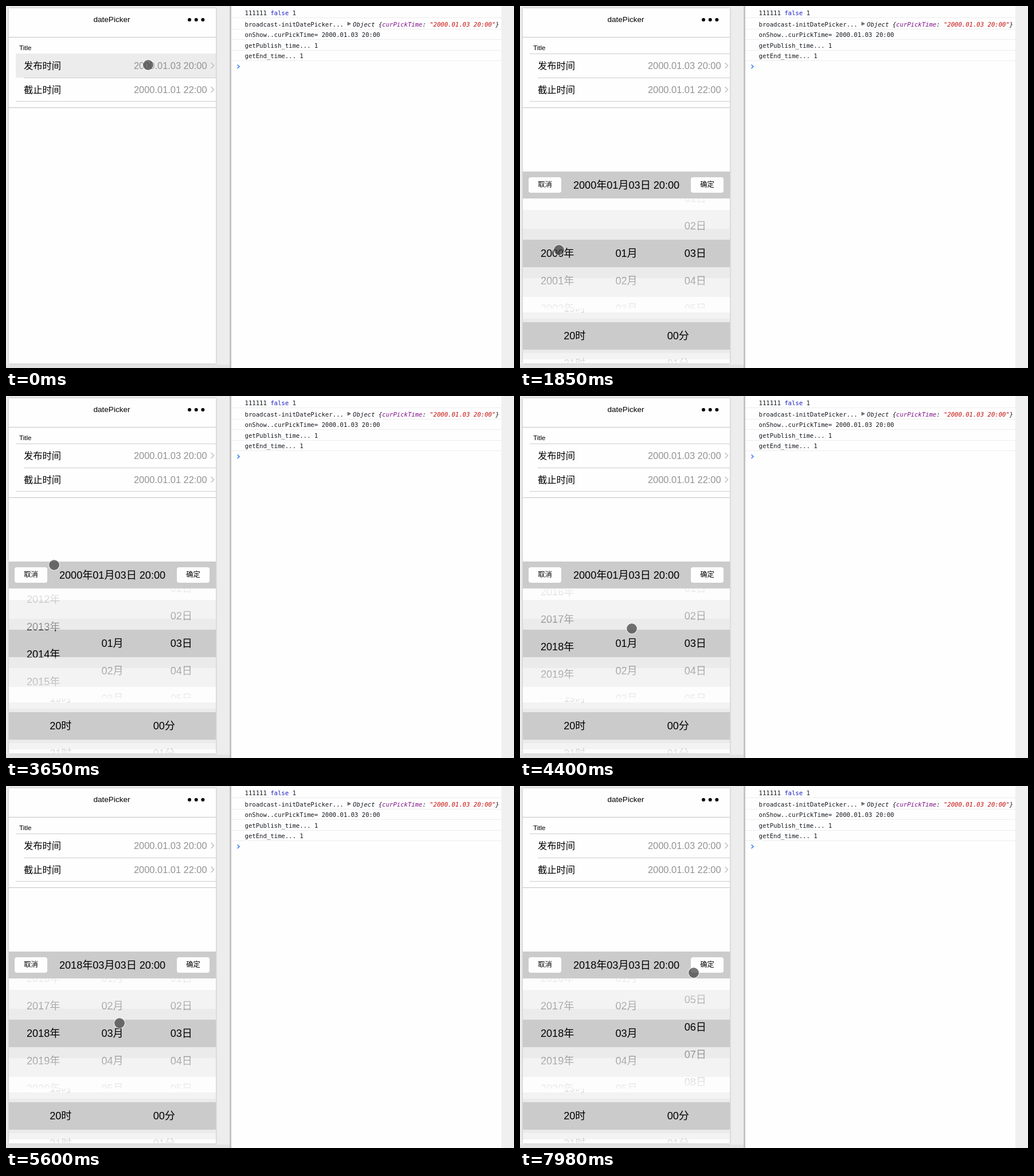
An HTML page for the animation above (8000 ms loop, 886 px wide and 632 px high).

```html
<!DOCTYPE html>
<html lang="zh-CN">
<head>
<meta charset="utf-8">
<title>datePicker</title>
<style>
  html, body { margin: 0; width: 100%; height: 100%; overflow: hidden; }
  #stage {
    position: relative; width: 886px; height: 632px; overflow: hidden; background: #ededed;
    font-family: "Liberation Sans", "Noto Sans CJK SC", "Noto Sans CJK", sans-serif; color: #000;
  }
  #stage div, #stage svg, #stage p { position: absolute; margin: 0; }
  p { line-height: 20px; white-space: pre; }

  .floor { left: 0; top: 626px; width: 390px; height: 6px; background: #e3e3e3; }
  .phone { left: 5px; top: 4px; width: 361px; height: 620px; background: #fefefe; box-shadow: 0 0 3px rgba(0, 0, 0, .25); }
  .rule { height: 1px; background: #cdcdcd; }
  .rule.full { left: 5px; width: 361px; background: #c4c4c4; }
  .press { left: 17px; top: 83px; width: 349px; height: 42px; background: #ececec; animation: leave 8s step-end infinite; }
  .title { left: 4px; top: 14px; width: 361px; text-align: center; font-size: 13.6px; }
  .label { left: 31px; font-size: 16.3px; }
  .value { left: 223px; font-size: 16.4px; color: #929292; }

  .panel { left: 5px; top: 289px; width: 361px; height: 335px; animation: enter 8s step-end infinite; }
  @keyframes leave { 0% { visibility: visible; } 1.75%, 100% { visibility: hidden; } }
  @keyframes enter { 0% { visibility: hidden; } 1.75%, 100% { visibility: visible; } }
  .head { left: 0; top: 0; width: 361px; height: 47px; background: #cbcbcb; }
  .head p { left: 0; width: 361px; top: 14px; text-align: center; font-size: 18.1px; }
  .btn { top: 10px; width: 57px; height: 27px; border-radius: 4px; background: #fefefe; font-size: 12.3px; line-height: 27px; text-align: center; }

  .picker {
    --band: calc(50% - 24px);
    left: 0; width: 361px; overflow: hidden; background: linear-gradient(
      #fdfdfd calc(var(--edge) * .28), #f3f3f3 0 calc(var(--edge) * .73), #ebebeb 0 var(--band),
      #cbcbcb 0 calc(100% - var(--band)), #ebebeb 0 calc(100% - var(--edge) * .73),
      #f3f3f3 0 calc(100% - var(--edge) * .28), #fdfdfd 0);
  }
  #date { --edge: 72px; top: 47px; height: 192px; }
  #time { --edge: 24px; top: 239px; height: 96px; }
  .wheels {
    --fade: linear-gradient(rgba(0, 0, 0, .05), rgba(0, 0, 0, .42) var(--band), #000 0 calc(100% - var(--band)), rgba(0, 0, 0, .42) 0, rgba(0, 0, 0, .05));
    inset: 0; -webkit-mask-image: var(--fade); mask-image: var(--fade);
  }
  .wheel { top: var(--edge); text-align: center; font-size: 18.1px; line-height: 48px; white-space: pre; }

  .split { left: 390px; top: 0; width: 3px; height: 632px; background: #c3c3c3; }
  .console {
    left: 393px; top: 0; width: 471px; height: 632px; background: #fefefe;
    font-family: "DejaVu Sans Mono", monospace; font-size: 10.6px; color: #14181e;
  }
  .console p { left: 23.5px; }
  .console .rule { left: 0; width: 471px; background: #ededed; }
  .gutter { left: 864px; top: 0; width: 22px; height: 632px; background: #f0f0f0; }
  .bool { color: #1c1cc4; } .key { color: #80108a; } .str { color: #c4100c; }

  #cursor {
    left: -10px; top: -10px; width: 20px; height: 20px; box-sizing: border-box; border-radius: 50%;
    border: 1.5px solid rgba(255, 255, 255, .7); background: rgba(60, 60, 60, .7) padding-box;
  }
</style>
</head>
<body>
<div id="stage">
  <div class="floor"></div>
  <div class="phone"></div>
  <p class="title">datePicker</p>
  <svg width="40" height="10" style="left:312px;top:19px"><circle cx="8" cy="5" r="3"/><circle cx="19.7" cy="5" r="3"/><circle cx="31.3" cy="5" r="3"/></svg>
  <div class="rule full" style="top:54px"></div>
  <p style="left:23px;top:63px;font-size:11.6px">Title</p>
  <div class="rule" style="left:17px;top:83px;width:349px"></div>
  <div class="press"></div>
  <div class="rule" style="left:31px;top:125px;width:335px"></div>
  <div class="rule" style="left:17px;top:166px;width:349px"></div>
  <div class="rule full" style="top:177px"></div>
  <p class="label" style="top:94px">发布时间</p>
  <p class="value" style="top:94px">2000.01.03 20:00</p>
  <p class="label" style="top:136px">截止时间</p>
  <p class="value" style="top:136px">2000.01.01 22:00</p>
  <svg width="10" height="60" style="left:355px;top:95px" fill="none" stroke="#c2c2c2" stroke-width="1.6"><path d="M2.5 4l5 5-5 5M2.5 46l5 5-5 5"/></svg>

  <div class="panel">
    <div class="head">
      <div class="btn" style="left:10px">取消</div>
      <p id="picked"></p>
      <div class="btn" style="left:293px">确定</div>
    </div>
    <div class="picker" id="date"><div class="wheels"></div></div>
    <div class="picker" id="time"><div class="wheels"></div></div>
  </div>

  <div class="split"></div>
  <div class="console">
    <p style="top:2px">111111 <span class="bool">false</span> 1</p>
    <div class="rule" style="top:20px"></div>
    <p style="top:22px">broadcast-initDatePicker...</p>
    <svg width="8" height="8" style="left:202px;top:27px"><path d="M.5.5L7 4 .5 7.5z" fill="#6e6e6e"/></svg>
    <p style="left:212px;top:22px"><i>Object {<span class="key">curPickTime</span>: <span class="str">"2000.01.03 20:00"</span>}</i></p>
    <div class="rule" style="top:40px"></div>
    <p style="top:40px">onShow..curPickTime= 2000.01.03 20:00</p>
    <div class="rule" style="top:58px"></div>
    <p style="top:59px">getPublish_time... 1</p>
    <div class="rule" style="top:77px"></div>
    <p style="top:77px">getEnd_time... 1</p>
    <div class="rule" style="top:95px"></div>
    <svg width="8" height="10" style="left:9px;top:101px" fill="none" stroke="#367cf1" stroke-width="1.5"><path d="M1.5 1.5l3.5 3.2-3.5 3.2"/></svg>
  </div>
  <div class="gutter"></div>
  <div id="cursor"></div>
</div>
<script>
const LOOP = 8000, TICK = 150, ROW = 48;
const $ = id => document.getElementById(id);

const progress = (t, from, to) => Math.min(1, Math.max(0, (t - from) / (to - from)));
const ease = (t, from, to) => { const u = progress(t, from, to); return u * u * (3 - 2 * u); };
const coast = (t, from, to) => 1 - (1 - progress(t, from, to)) ** 2;

function wheel(picker, col, cols, first, count, unit, start) {
  const el = document.createElement('div');
  const width = 361 / cols;
  el.className = 'wheel';
  el.style.left = col * width + 'px';
  el.style.width = width + 'px';
  el.textContent = Array.from({ length: count }, (_, i) =>
    String(first + i).padStart(2, '0') + unit).join('\n');
  $(picker).firstElementChild.append(el);
  const scroll = px => { el.style.transform = `translateY(${(first - start) * ROW - px}px)`; };
  scroll(0);
  return scroll;
}

const years = wheel('date', 0, 3, 2000, 24, '年', 2000);
const months = wheel('date', 1, 3, 1, 12, '月', 1);
const days = wheel('date', 2, 3, 1, 31, '日', 3);
wheel('time', 0, 2, 0, 24, '时', 20);
wheel('time', 1, 2, 0, 60, '分', 0);

// Pointer strokes: start, end, and where the stroke leads.
const origin = [248, 103];
const strokes = [
  [650, 950, 255, 314],   // rest below the rows
  [1100, 1850, 68, 426],  // to the years
  [2000, 2150, 69, 470],
  [2150, 2750, 74, 329],  // first flick
  [2750, 3200, 75, 475],
  [3200, 3650, 84, 295],  // second flick
  [3650, 4400, 195, 406], // to the months
  [4400, 4850, 200, 508],
  [4850, 5450, 198, 414], // drag two months
  [5600, 5750, 176, 369],
  [5900, 6500, 299, 436], // to the days
  [6500, 6800, 307, 508],
  [7100, 8000, 303, 326]  // drag the days
];

function pointer(t) {
  let [x, y] = origin;
  for (const [from, to, toX, toY] of strokes) {
    const k = ease(t, from, to);
    x += (toX - x) * k;
    y += (toY - y) * k;
  }
  return `translate(${x}px, ${y}px)`;
}

function draw(now) {
  const t = Math.floor((now % LOOP - 30) / TICK) * TICK + 50;
  $('cursor').style.transform = pointer(t);
  years(485 * ease(t, 2150, 3200) + 168 * ease(t, 3200, 3650) + 211 * coast(t, 3650, 4550));
  months(2 * ROW * ease(t, 4850, 5450));
  days(155 * ease(t, 7100, 8000));
  $('picked').textContent = `${t < 4700 ? 2000 : 2018}年0${t < 5600 ? 1 : 3}月03日 20:00`;
}

function loop() {
  draw(performance.now());
  requestAnimationFrame(loop);
}
loop();
</script>
</body>
</html>
```
